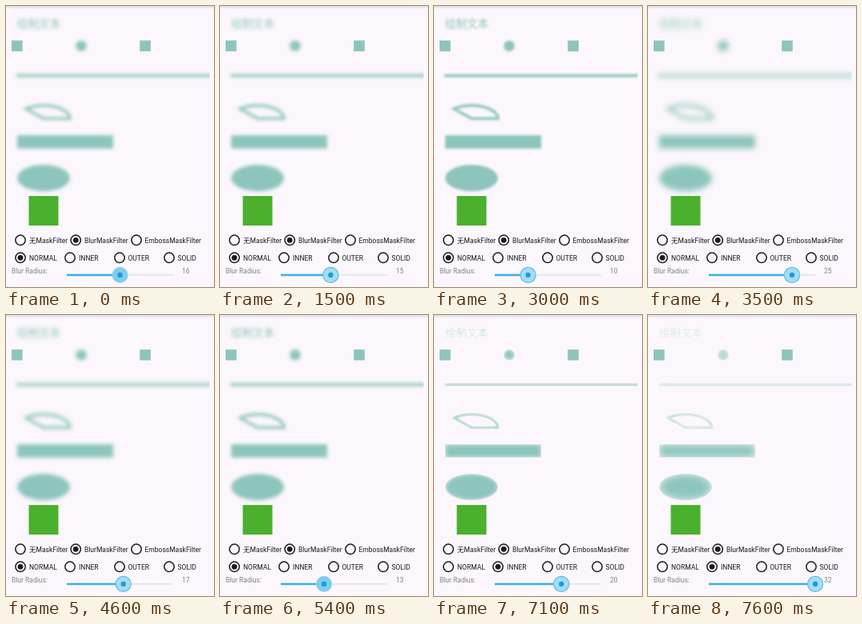
An HTML page that plays this animation: 260x352 px, repeating every 8 s.

```html
<!DOCTYPE html>
<html lang="zh-CN">
<head>
<meta charset="utf-8">
<title>Mask filter demo</title>
<style>
  html, body { margin: 0; width: 100%; height: 100%; overflow: hidden; background: #fbf7fc; }
  svg { display: block; width: 100%; height: 100%; }
  text { font: 8.5px Roboto, "Noto Sans CJK SC", "Noto Sans CJK", sans-serif; fill: #1c1c1e; }
  .muted { fill: #858487; }
  .shape { fill: #8dc5bc; }
  .outline { fill: none; stroke: #8dc5bc; stroke-width: 3.5; }
  .title { font-size: 13.5px; fill: #8dc5bc; }
  .ring { fill: none; stroke: #1c1c1e; stroke-width: 1.5; }
</style>
</head>
<body>
<svg viewBox="0 0 260 352">
  <defs>
    <linearGradient id="shadow" x2="0" y2="1">
      <stop stop-color="#dedce0"/><stop offset="1" stop-color="#fbf7fc"/>
    </linearGradient>
    <clipPath id="view"><rect x="6.5" y="4" width="248" height="275"/></clipPath>
    <filter id="normal" filterUnits="userSpaceOnUse" x="-20" y="-20" width="320" height="320" color-interpolation-filters="sRGB">
      <feGaussianBlur/>
    </filter>
    <filter id="inner" filterUnits="userSpaceOnUse" x="-20" y="-20" width="320" height="320" color-interpolation-filters="sRGB">
      <feGaussianBlur/>
      <feComposite operator="in" in2="SourceGraphic"/>
    </filter>
  </defs>
  <rect width="260" height="4" fill="url(#shadow)"/>

  <g clip-path="url(#view)">
    <g id="masked">
      <text class="title" x="14" y="26.5">绘制文本</text>
      <circle class="shape" cx="94" cy="50" r="6.8"/>
      <path class="outline" d="M13 87.2H290"/>
      <path id="wedge" class="outline"/>
      <rect class="shape" x="14" y="162" width="120" height="16.5"/>
      <ellipse class="shape" cx="47" cy="215.5" rx="33" ry="16.5"/>
    </g>
    <path class="shape" d="M7 43.2h13.6v13.6h-13.6zM167.2 43.2h13.6v13.6h-13.6z"/>
    <rect x="28.5" y="238" width="37" height="37" fill="#4bb02d"/>
  </g>

  <g id="radios"></g>

  <text class="muted" x="7" y="334.5">Blur Radius:</text>
  <text class="muted" x="220" y="334.5" id="value"></text>
  <path d="M76 337H209" stroke="#d9d7db"/>
  <path id="progress" stroke="#33b1e4" stroke-width="2.4"/>
  <g id="thumb">
    <circle id="halo" cy="337"/>
    <circle cy="337" r="3.2" fill="#1b9fd8"/>
  </g>
</svg>
<script>
const LOOP = 8000, STEP = 100;
const $ = id => document.getElementById(id);

// [time, blur radius], linear in between
const drag = [
  [0, 16], [1400, 16], [2000, 7], [2300, 4], [2600, 4], [3000, 10], [3500, 25],
  [3800, 22], [4100, 22], [5000, 13], [6800, 13], [7600, 32], [LOOP, 32]
];

function radiusAt(time) {
  const i = drag.findIndex(([t]) => t > time);
  const [t0, r0] = drag[i - 1], [t1, r1] = drag[i];
  return Math.round(r0 + (r1 - r0) * (time - t0) / (t1 - t0));
}

function addRadio(x, y, label, labelX) {
  $('radios').insertAdjacentHTML('beforeend',
    `<circle class="ring" cx="${x}" cy="${y}" r="6.2"/>
     <circle cx="${x}" cy="${y}" r="3.4" fill="#1c1c1e" visibility="hidden"/>
     <text x="${labelX}" y="${y + 3.2}">${label}</text>`);
  const dot = $('radios').lastElementChild.previousElementSibling;
  return on => dot.setAttribute('visibility', on ? 'visible' : 'hidden');
}

addRadio(18, 293.3, '无MaskFilter', 29);
addRadio(87.2, 293.3, 'BlurMaskFilter', 98)(true);
addRadio(163, 293.3, 'EmbossMaskFilter', 173.5);
const selectNormal = addRadio(18, 315.3, 'NORMAL', 29);
const selectInner = addRadio(80, 315.3, 'INNER', 91);
addRadio(142, 315.3, 'OUTER', 152.5);
addRadio(204, 315.3, 'SOLID', 214.5);

const start = 228 * Math.PI / 180;
$('wedge').setAttribute('d',
  `M47 141L${47 + 33 * Math.cos(start)} ${141 + 16.5 * Math.sin(start)}A33 16.5 0 0 1 80 141Z`);

function set(id, attributes) {
  for (const name in attributes) $(id).setAttribute(name, attributes[name]);
}

function render(now) {
  const time = Math.floor(now % LOOP / STEP) * STEP;
  const radius = radiusAt(time);
  const inner = time >= 6300;
  const pressed = time >= 1500 && time < 5400 || time >= 6900;
  const x = 76 + radius * 4.16;

  // Device pixels are scaled down to the stage width
  const sigma = (radius * 0.57735 + 0.5) * 260 / 1080;
  for (const blur of document.querySelectorAll('feGaussianBlur')) blur.setAttribute('stdDeviation', sigma);
  set('masked', { filter: `url(#${inner ? 'inner' : 'normal'})` });
  selectNormal(!inner);
  selectInner(inner);

  $('value').textContent = radius;
  set('progress', { d: `M76 337H${x}` });
  set('thumb', { transform: `translate(${x})` });
  set('halo', pressed
    ? { r: 9.6, fill: '#a8dcf4', stroke: '#5cc0ea', 'stroke-width': 1.2 }
    : { r: 10, fill: '#80cdf0', stroke: 'none' });
}

function tick() {
  render(performance.now());
  requestAnimationFrame(tick);
}
tick();
</script>
</body>
</html>
```
